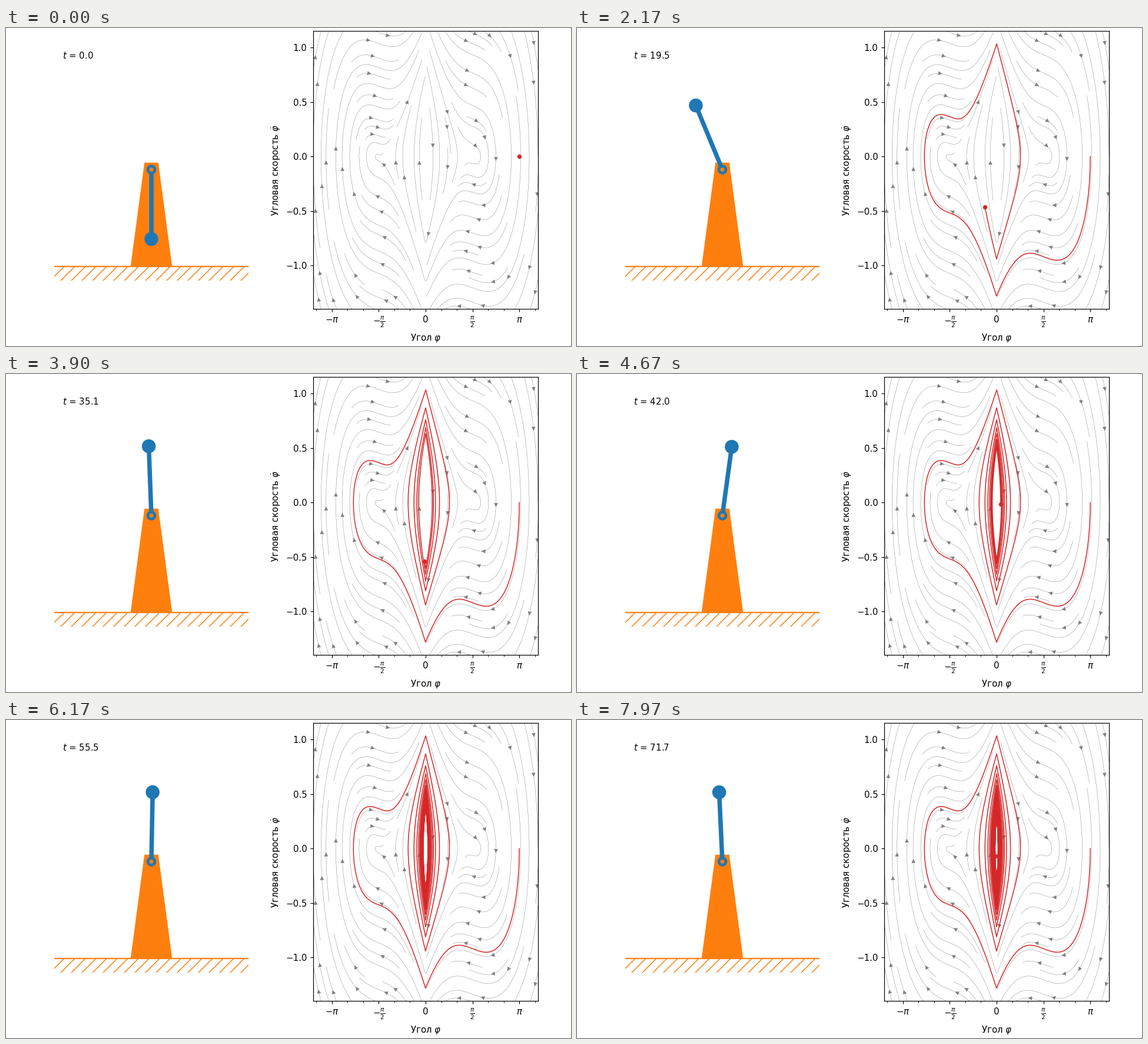
Recreate the animation shown at these times as a matplotlib script. Size 960 px wide and 540 px high, loop 8 s.

```python
import numpy as np
import matplotlib.pyplot as plt
from matplotlib.animation import FuncAnimation
from matplotlib.patches import Circle, Polygon
from matplotlib.ticker import AutoMinorLocator, MultipleLocator

W, H, DPI = 960, 540, 108
FRAMES, LOOP_MS = 240, 8000
T_STEP, SUB = 0.3, 60          # model time per frame, solver steps per frame
GRAVITY = TORQUE = 0.98
DAMPING = 0.107
BLUE, ORANGE, RED = "tab:blue", "tab:orange", "tab:red"

plt.rcParams.update({"font.family": "DejaVu Sans", "font.size": 10})


def accel(phi, omega, side):
    """Inverted pendulum pushed back to the top by a relay torque."""
    return GRAVITY * np.sin(phi) - TORQUE * side - DAMPING * omega


def solve(phi, omega, steps, dt):
    """RK4 path that keeps the relay side fixed inside each step."""
    path = np.empty((steps + 1, 2))
    path[0] = phi, omega
    for i in range(steps):
        side = np.sign(phi)
        a1, b1 = omega, accel(phi, omega, side)
        a2, b2 = omega + dt / 2 * b1, accel(phi + dt / 2 * a1, omega + dt / 2 * b1, side)
        a3, b3 = omega + dt / 2 * b2, accel(phi + dt / 2 * a2, omega + dt / 2 * b2, side)
        a4, b4 = omega + dt * b3, accel(phi + dt * a3, omega + dt * b3, side)
        phi += dt / 6 * (a1 + 2 * a2 + 2 * a3 + a4)
        omega += dt / 6 * (b1 + 2 * b2 + 2 * b3 + b4)
        path[i + 1] = phi, omega
    return path


def pixel_axes(left, top, right, bottom):
    return fig.add_axes([left / W, 1 - bottom / H, (right - left) / W, (bottom - top) / H])


path = solve(np.pi, 0.0, (FRAMES - 1) * SUB, T_STEP / SUB)

fig = plt.figure(figsize=(W / DPI, H / DPI), dpi=DPI)

# Pendulum
unit = 330 / 2.8
pend = pixel_axes(82, 429 - 3.4 * unit, 412, 429)
pend.set(xlim=(-1.4, 1.4), ylim=(-1.6, 1.8))
pend.axis("off")
pend.plot([-1.4, 1.4], [-1.4, -1.4], color=ORANGE, lw=1.5)
pend.fill_between([-1.4, 1.4], -1.4, -1.6, facecolor="none", edgecolor=ORANGE, hatch="//", lw=0)
pend.add_patch(Polygon([(-0.3, -1.4), (-0.1, 0.1), (0.1, 0.1), (0.3, -1.4)], color=ORANGE, lw=0))
rod, = pend.plot([], [], color=BLUE, lw=5, zorder=3)
bob = pend.add_patch(Circle((0, -1), 0.1, color=BLUE, lw=0, zorder=3))
pend.add_patch(Circle((0, 0), 0.07, color=BLUE, lw=0, zorder=4))
pend.add_patch(Circle((0, 0), 0.03, color=ORANGE, lw=0, zorder=5))
clock = fig.text(95.5 / W, 1 - 52 / H, "")

# Phase plane
X, Y = 1.2 * np.pi, (-1.4, 1.15)
phase = pixel_axes(522, 5.4, 904, 477.4)
phi, omega = np.meshgrid(np.linspace(-X, X, 100), np.linspace(*Y, 100))
phase.streamplot(phi, omega, omega, accel(phi, omega, np.sign(phi)), color="gray", linewidth=0.3)
phase.set(xlim=(-X, X), ylim=Y)
phase.set_xlabel(r"Угол $\varphi$")
phase.set_ylabel(r"Угловая скорость $\dot{\varphi}$")
phase.set_xticks(np.pi / 2 * np.arange(-2, 3),
                 [r"$-\pi$", r"$-\frac{\pi}{2}$", "0", r"$\frac{\pi}{2}$", r"$\pi$"])
phase.xaxis.set_minor_locator(AutoMinorLocator(3))
phase.yaxis.set_major_locator(MultipleLocator(0.5))
trail, = phase.plot([], [], color=RED, lw=1, zorder=3)
dot, = phase.plot([], [], "o", color=RED, ms=5, mew=0, zorder=4)


def draw(i):
    k = i * SUB
    p, w = path[k]
    x, y = np.sin(p), np.cos(p)
    rod.set_data([0, x], [0, y])
    bob.center = x, y
    trail.set_data(path[:k + 1, 0], path[:k + 1, 1])
    dot.set_data([p], [w])
    clock.set_text(f"$t$ = {i * T_STEP:.1f}")
    return rod, bob, trail, dot, clock


anim = FuncAnimation(fig, draw, frames=FRAMES, interval=LOOP_MS / FRAMES, repeat=True, repeat_delay=0)
plt.show()
```
